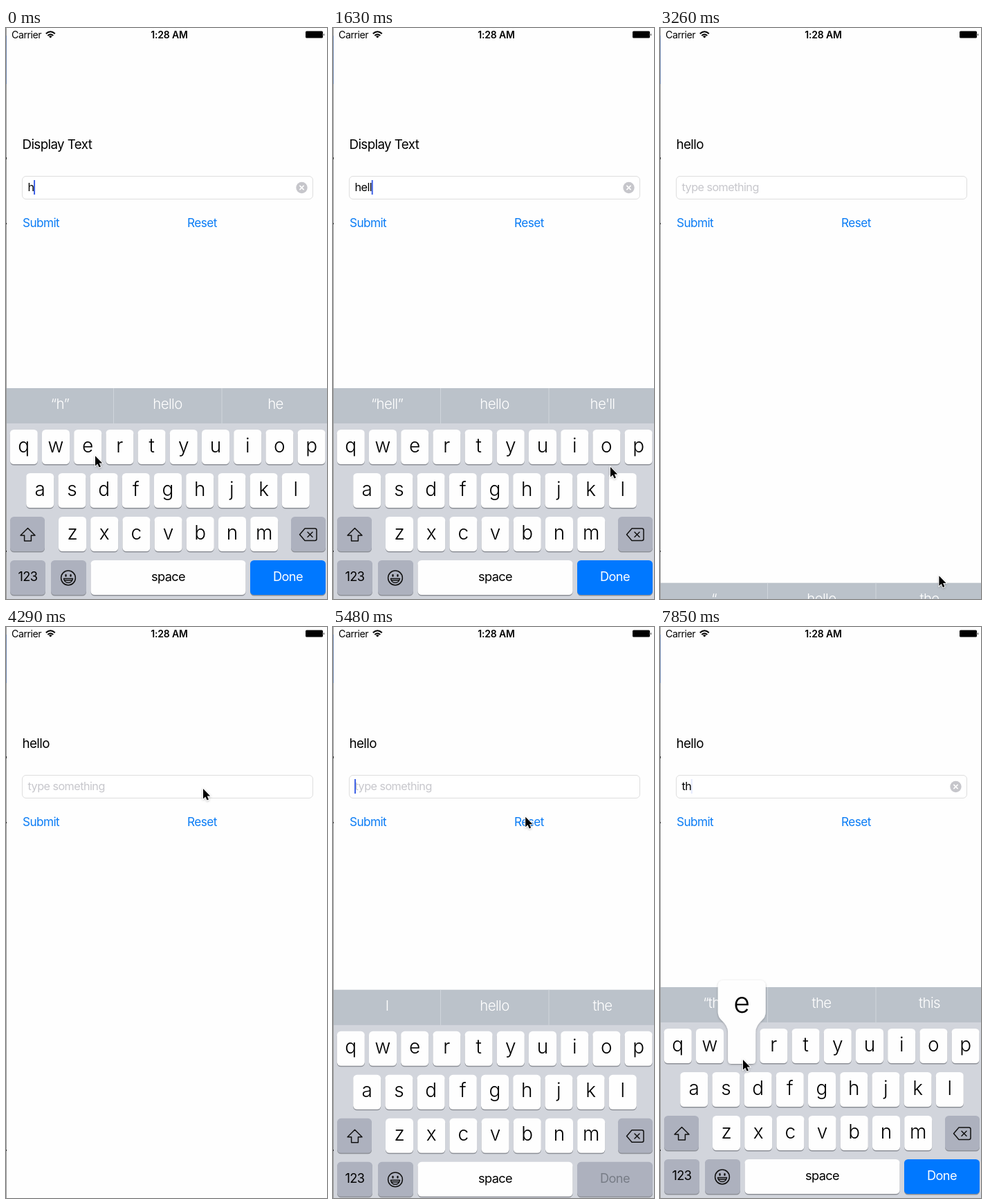
Write an HTML page that moves like this. It is 464 px wide and 826 px high and loops after 7990 ms.

```html
<!DOCTYPE html>
<html lang="en">
<head>
<meta charset="utf-8">
<title>Typing demo</title>
<style>
  html, body { margin: 0; width: 100%; height: 100%; overflow: hidden; background: #fefefe; }
  svg { display: block; width: 100%; height: 100%; }
  text { font-family: Inter, Roboto, "Liberation Sans", sans-serif; letter-spacing: -.033em; white-space: pre; }
  .mid { text-anchor: middle; }
  .key { font-size: 28px; font-weight: 300; letter-spacing: 0; }
  .small { font-size: 18.2px; }
  .hint { font-size: 20.5px; font-weight: 300; fill: #fff; }
  .field { font-size: 16.2px; }
  .link { font-size: 17.2px; fill: #0a7cf5; }
  .line { fill: none; stroke: #111; stroke-width: 1.5; stroke-linejoin: round; stroke-linecap: round; }
</style>
</head>
<body>
<svg id="stage" viewBox="0 0 464 826" preserveAspectRatio="none">
  <defs>
    <linearGradient id="fade">
      <stop offset="0" stop-color="#fff" stop-opacity=".35"/>
      <stop offset=".25" stop-color="#fff"/>
      <stop offset=".7" stop-color="#fff"/>
      <stop offset="1" stop-color="#fff" stop-opacity=".25"/>
    </linearGradient>
    <filter id="soft" x="-30%" y="-30%" width="160%" height="160%">
      <feDropShadow dx="0" dy="1" stdDeviation="1.8" flood-opacity=".28"/>
    </filter>
  </defs>
  <rect width="464" height="826" fill="#fefefe"/>

  <text x="8" y="14.5" font-size="14.2">Carrier</text>
  <g fill="none" stroke="#000" stroke-width="2">
    <path d="M57.8 8.2Q64.3 2.4 70.8 8.2"/>
    <path d="M60.3 11Q64.3 7.4 68.3 11"/>
  </g>
  <path d="M64.3 14.6L61.9 12.2Q64.3 10.4 66.7 12.2Z"/>
  <text class="mid" x="236" y="14.5" font-size="14" font-weight="600" style="letter-spacing:-.01em">1:28 AM</text>
  <rect x="433" y="4.5" width="25" height="10" rx="1.5"/>
  <path d="M459 7.5q1.8 2 0 4z"/>

  <text id="label" x="23.5" y="175" font-size="18.8"></text>
  <rect x="23.5" y="214.5" width="420" height="33" rx="5.5" fill="#fff" stroke="#dedede"/>
  <text class="field" x="31.5" y="236" fill="#c7c7cc" id="holder">type something</text>
  <text class="field" x="31.5" y="236" id="typed"></text>
  <rect id="caret" y="220" width="2" height="21" fill="#3f62e6"/>
  <g id="clear">
    <circle cx="427.5" cy="231" r="8.2" fill="#c6c6cb"/>
    <path d="M424.4 227.9l6.2 6.2m0-6.2l-6.2 6.2" stroke="#fff" stroke-width="1.6"/>
  </g>
  <text class="link" x="24" y="287.5">Submit</text>
  <text class="link" x="262" y="287.5">Reset</text>

  <g id="board">
    <rect x="0" y="521" width="464" height="305" fill="#d2d5dc"/>
    <rect x="0" y="521" width="464" height="51" fill="#bbc2ca"/>
    <path d="M155.5 521v51M312 521v51" stroke="#d0d5db"/>
    <g id="hints"></g>
    <g id="keys"></g>
    <path class="line" d="M31.5 723.5L42 734H36.4V742H26.6V734H21Z"/>
    <path class="line" d="M432 724H446.5Q449 724 449 726.5V739Q449 741.5 446.5 741.5H432L424.5 732.7Z"/>
    <path class="line" d="M436 729.2l7 7m0-7l-7 7"/>
    <circle class="line" cx="90" cy="795.5" r="10.4"/>
    <g fill="#111">
      <ellipse cx="86.5" cy="792" rx="1.3" ry="2"/>
      <ellipse cx="93.5" cy="792" rx="1.3" ry="2"/>
    </g>
    <path class="line" d="M83.5 796.5H96.5Q95.5 802.5 90 802.5T83.5 796.5ZM85 799H95"/>
    <g id="popup">
      <path fill="#fefefe" filter="url(#soft)" d="M-6-70H46Q54.5-70 54.5-61.500V-24Q54.500-17 49-12Q40-4 40 5V46Q40 51 35 51H5Q0 51 0 46V5Q0-4-9-12Q-14.500-17-14.500-24V-61.500Q-14.500-70-6-70Z"/>
      <text class="mid key" id="big" x="20" y="-23" style="font-size:41px"></text>
    </g>
  </g>

  <rect width="1" height="826" fill="#9b9b9b"/>
  <rect y="11" width="1" height="70" fill="#6f86ad"/>
  <path d="M0 187h1v3h-1zM0 282h1v2h-1zM0 756h1v2h-1z" fill="#222"/>
  <path id="arrow" d="M0 0V14.500L3.300 11.400L5.600 16.600L8 15.500L5.700 10.400H10.200Z" stroke="#fff" stroke-width="1.600" paint-order="stroke" filter="url(#soft)"/>
</svg>
<script>
const LOOP = 7990, STEPS = 54, TRAVEL = 305;
const $ = id => document.getElementById(id);

function add(parent, tag, attrs, text) {
  const el = document.createElementNS('http://www.w3.org/2000/svg', tag);
  for (const name in attrs) el.setAttribute(name, attrs[name]);
  if (text) el.textContent = text;
  parent.appendChild(el);
  return el;
}

function addKey(x, y, w, fill) {
  add($('keys'), 'rect', { x, y: y + 1.5, width: w, height: 50, rx: 5.5, fill: '#8d9097' });
  return add($('keys'), 'rect', { x, y, width: w, height: 50, rx: 5.5, fill });
}

const caption = (x, text) =>
  add($('keys'), 'text', { class: 'mid small', x, y: 800 }, text);

const spots = {};
[['qwertyuiop', 5.8], ['asdfghjkl', 29.2], ['zxcvbnm', 76]].forEach(([row, left], r) => {
  [...row].forEach((ch, i) => {
    const x = left + 46.2 * i, y = 581 + 63 * r;
    addKey(x, y, 40, '#fefefe');
    const glyph = add($('keys'), 'text', { class: 'mid key', x: x + 20, y: y + 32.5 }, ch);
    spots[ch] = { x, y, glyph };
  });
});
const GREY = '#adb1be';
addKey(6, 707, 50, GREY);
addKey(412, 707, 50, GREY);
addKey(6, 770, 51, GREY);
addKey(65, 770, 51, GREY);
addKey(122.500, 770, 224, '#fefefe');
const doneKey = addKey(353, 770, 109, GREY);
caption(31.5, '123');
caption(234.5, 'space');
const doneText = caption(407.5, 'Done');
const hints = [78, 233.5, 389.5].map(x =>
  add($('hints'), 'text', { class: 'mid hint', x, y: 551 }));

// step, field text, three suggestions, fading flag
const states = [
  [0, 'h', '“h”', 'hello', 'he'],
  [2, 'he', '“he”', 'hello', 'her'],
  [8, 'hel', '“hel”', 'hello', 'help'],
  [10, 'hell', '“hell”', 'hello', "he'll"],
  [13, 'hello', '“hello”', 'hellos', ''],
  [21, '', '“', 'hello', 'the'],
  [24, '', 'I', 'hello', 'the'],
  [44, 't', '“', 'thell', 'thi', true],
  [45, 't', '“t”', 'the', 'this'],
  [47, 'th', '“th”', 'the', 'this']
];
const presses = { 1: 'e', 7: 'l', 9: 'l', 12: 'o', 43: 't', 46: 'h', 53: 'e' };
const DONE_DOWN = 20, SENT = 21, FOCUS = 35;

// step, x, y of the pointer tip
const route = [
  [0, 129, 619], [2, 129, 619], [6, 424, 668], [10, 424, 668], [11, 401, 635],
  [12, 396, 618], [14, 396, 618], [19, 404, 792], [24, 403, 793], [29, 285, 234],
  [36, 285, 234], [41, 220, 626], [44, 220, 626], [46, 282, 670], [47, 282, 670],
  [50, 140, 631], [52, 120, 626], [54, 120, 626]
];

function pointer(s) {
  const i = route.findIndex(p => p[0] > s);
  const a = route[i - 1], b = route[i];
  const u = (s - a[0]) / (b[0] - a[0]), k = u * u * (3 - 2 * u);
  return [a[1] + (b[1] - a[1]) * k, a[2] + (b[2] - a[2]) * k];
}

function boardShift(s) {
  if (s < SENT) return 0;
  if (s < FOCUS) return TRAVEL * (s > 24 ? 1 : 1 - Math.exp(-1.48 * (s - 20.26)));
  return TRAVEL * Math.exp(-1.48 * (s - 34.04));
}

function blink(steps) {
  const p = steps * LOOP / STEPS % 1000 / 1000;
  if (p < .5) return 1;
  return p < .75 ? 1 - (p - .5) / .25 : Math.max(0, (p - .87) / .13);
}

const show = (el, on) => el.setAttribute('visibility', on ? 'visible' : 'hidden');

function render(ms) {
  const s = Math.floor(ms % LOOP / LOOP * STEPS);
  const [since, text, a, b, c, fading] = states.filter(e => e[0] <= s).pop();
  const typed = $('typed'), caret = $('caret');

  $('label').textContent = s < SENT ? 'Display Text' : 'hello';
  typed.textContent = text;
  show($('holder'), !text);
  show($('clear'), text);
  show(caret, s < SENT || s >= FOCUS);
  caret.setAttribute('x', 31 + (text ? typed.getComputedTextLength() : 0));
  caret.setAttribute('opacity', blink(s - (s >= FOCUS ? Math.max(since, FOCUS) : since)));

  [a, b, c].forEach((word, i) => {
    hints[i].textContent = word;
    hints[i].style.fill = fading && i ? 'url(#fade)' : '#fff';
  });
  $('board').setAttribute('transform', `translate(0 ${boardShift(s).toFixed(2)})`);

  const down = s === DONE_DOWN;
  doneKey.setAttribute('fill', down ? '#fefefe' : text ? '#0078ff' : GREY);
  doneText.setAttribute('fill', down ? '#000' : text ? '#fff' : '#777c86');

  const ch = presses[s];
  for (const k in spots) show(spots[k].glyph, k !== ch);
  show($('popup'), ch);
  if (ch) {
    $('popup').setAttribute('transform', `translate(${spots[ch].x} ${spots[ch].y})`);
    $('big').textContent = ch;
  }
  const [x, y] = pointer(s);
  $('arrow').setAttribute('transform', `translate(${x.toFixed(1)} ${y.toFixed(1)})`);
}

const start = performance.now();
function tick() {
  render(performance.now() - start);
  requestAnimationFrame(tick);
}
tick();
</script>
</body>
</html>
```
